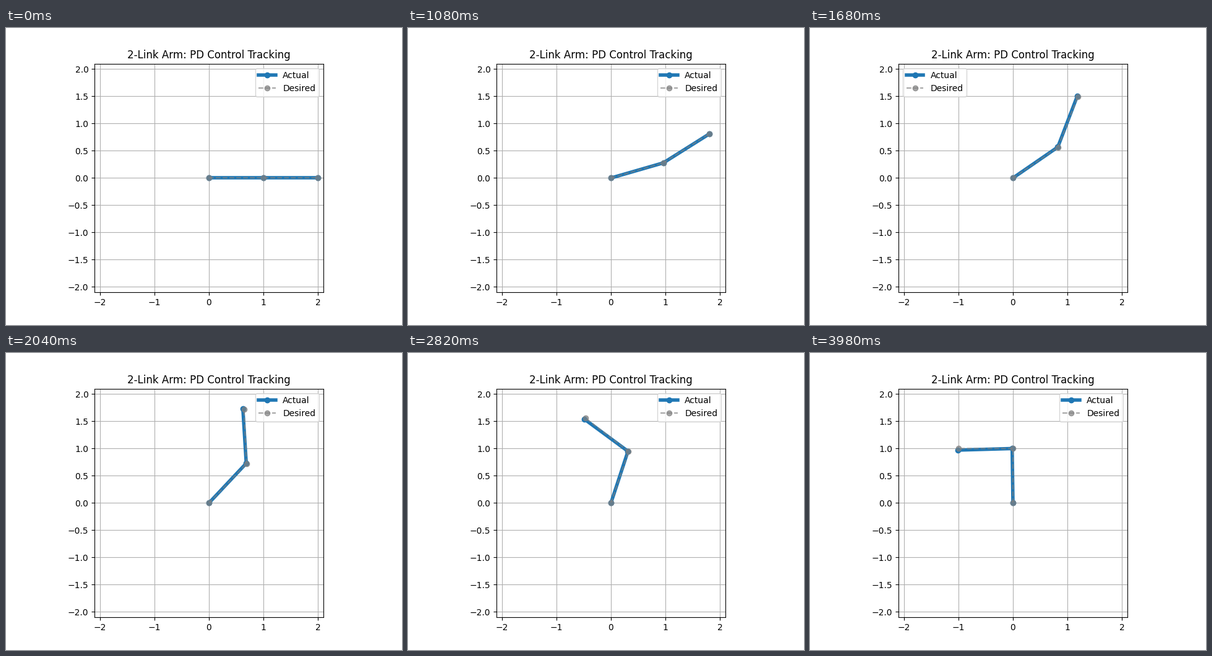
Animation, 640 px wide and 480 px high, one loop 4 s. Source, as a matplotlib script:

```python
import numpy as np
import matplotlib.pyplot as plt
from matplotlib.animation import FuncAnimation

DT, T = 0.02, 4.0
FRAMES = round(T / DT)
GOAL = np.pi / 2

# Tracking error: acceleration lag, velocity lead and a damped start
ACC_LAG, VEL_LEAD = 0.0245, 0.012
DECAY, OMEGA = 3.2, 5.5


def desired_angle(t):
    s = t / T
    return GOAL * s**2 * (3 - 2 * s)


def actual_angle(t):
    s = t / T
    vel = GOAL * 6 * s * (1 - s) / T
    acc = GOAL * 6 * (1 - 2 * s) / T**2
    ring = np.exp(-DECAY * t) * (
        np.cos(OMEGA * t) + DECAY / OMEGA * np.sin(OMEGA * t))
    return desired_angle(t) - ACC_LAG * acc * (1 - ring) + VEL_LEAD * vel


def arm(q):
    """Joint positions of two unit links, both turned by q."""
    x = [0, np.cos(q), np.cos(q) + np.cos(2 * q)]
    y = [0, np.sin(q), np.sin(q) + np.sin(2 * q)]
    return x, y


fig, ax = plt.subplots(figsize=(6.4, 4.8), dpi=100)
ax.set_aspect("equal")
ax.set_xlim(-2.1, 2.1)
ax.set_ylim(-2.1, 2.1)
ax.grid(True)
ax.set_title("2-Link Arm: PD Control Tracking")
actual, = ax.plot([], [], "o-", lw=4, label="Actual")
desired, = ax.plot([], [], "o--", color="gray", alpha=0.7, label="Desired")
ax.legend(loc="best")


def update(i):
    t = i * DT
    actual.set_data(*arm(actual_angle(t)))
    desired.set_data(*arm(desired_angle(t)))
    return actual, desired


anim = FuncAnimation(fig, update, frames=FRAMES, interval=1000 * DT,
                     repeat=True, repeat_delay=0)
plt.show()
```
